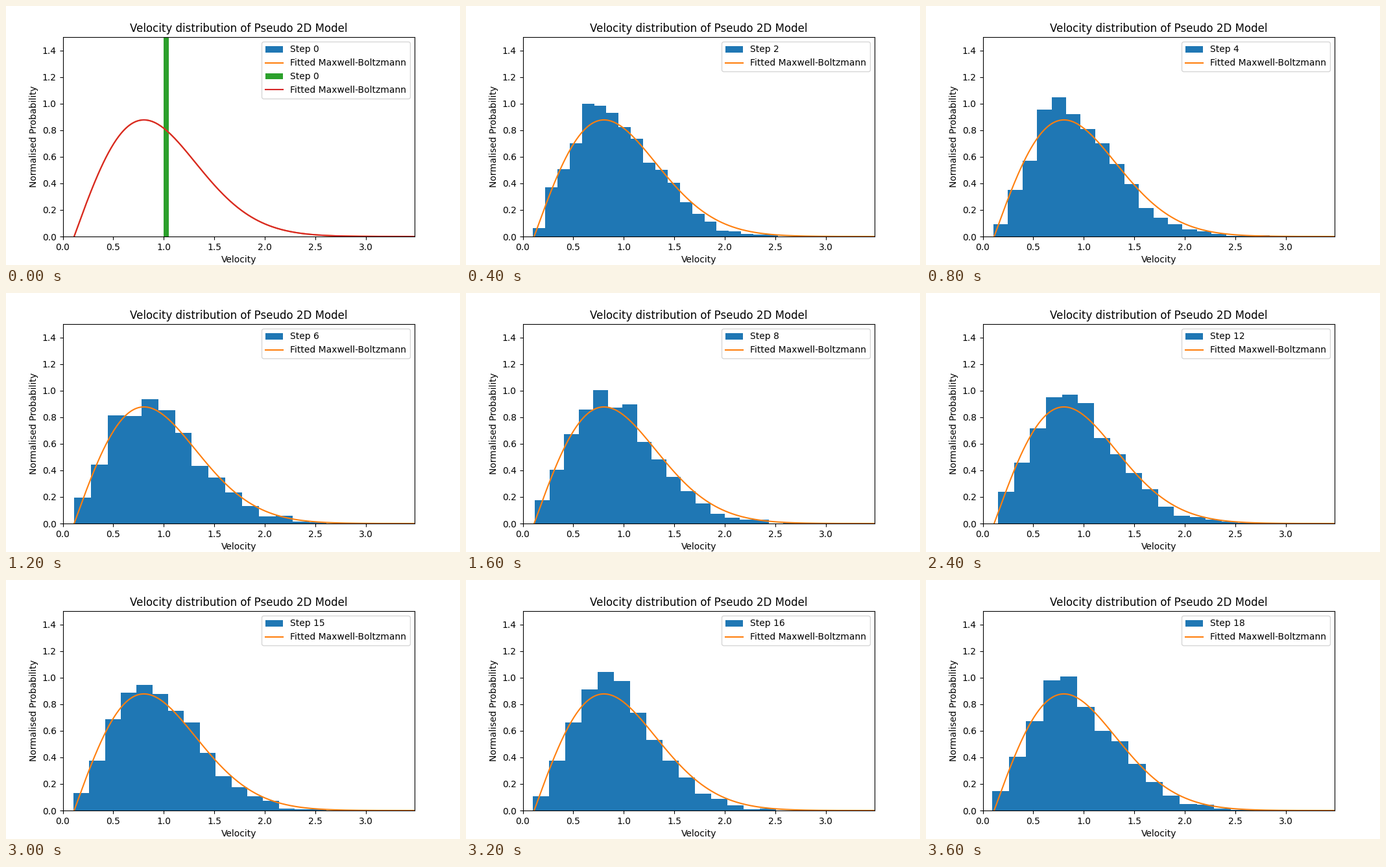
Animation of 700 by 400 pixels, one loop 3800 ms. Source, as a matplotlib script:

```python
import matplotlib.pyplot as plt
import numpy as np
from matplotlib.animation import FuncAnimation

STEPS, INTERVAL = 19, 200
V_MAX = 3.483
LOC, SCALE = 0.112, 0.6916
PARTICLES, BINS = 2000, 20

# Slowest and fastest speed drift between these key steps
KEY_STEPS = [2, 6, 8, 12, 15, 18]
SLOWEST = [0.100, 0.113, 0.119, 0.151, 0.106, 0.091]
FASTEST = [2.526, 3.440, 3.014, 3.316, 3.233, 3.472]


def speeds_at(step):
    """Equal speeds at the start, Maxwell distributed after that."""
    if step == 0:
        return np.ones(PARTICLES)
    rng = np.random.default_rng(step)
    spread = rng.normal(0.6, 0.07, (PARTICLES, 1))
    return np.linalg.norm(spread * rng.normal(size=(PARTICLES, 3)), axis=1)


def span_at(step):
    if step == 0:
        return 0.5, 1.5
    return (np.interp(step, KEY_STEPS, SLOWEST),
            np.interp(step, KEY_STEPS, FASTEST))


def fitted(v):
    z = (v - LOC) / SCALE
    return z / SCALE * np.exp(-z ** 2 / 2)


fig, ax = plt.subplots(figsize=(7, 4), dpi=100)
velocity = np.linspace(0, V_MAX, 400)


def plot_step(step):
    ax.hist(speeds_at(step), BINS, span_at(step), density=True,
            label=f"Step {step}")
    ax.plot(velocity, fitted(velocity), label="Fitted Maxwell-Boltzmann")


def draw(step):
    ax.clear()
    for _ in range(2 if step == 0 else 1):
        plot_step(step)
    ax.set_xlim(0, V_MAX)
    ax.set_ylim(0, 1.5)
    ax.set_xticks(np.arange(0, 3.1, 0.5))
    ax.set_yticks(np.arange(0, 1.5, 0.2))
    ax.set_xlabel("Velocity")
    ax.set_ylabel("Normalised Probability")
    ax.set_title("Velocity distribution of Pseudo 2D Model")
    ax.legend(loc="upper right")


anim = FuncAnimation(fig, draw, frames=STEPS, interval=INTERVAL,
                     repeat=True, repeat_delay=0)
plt.show()
```
